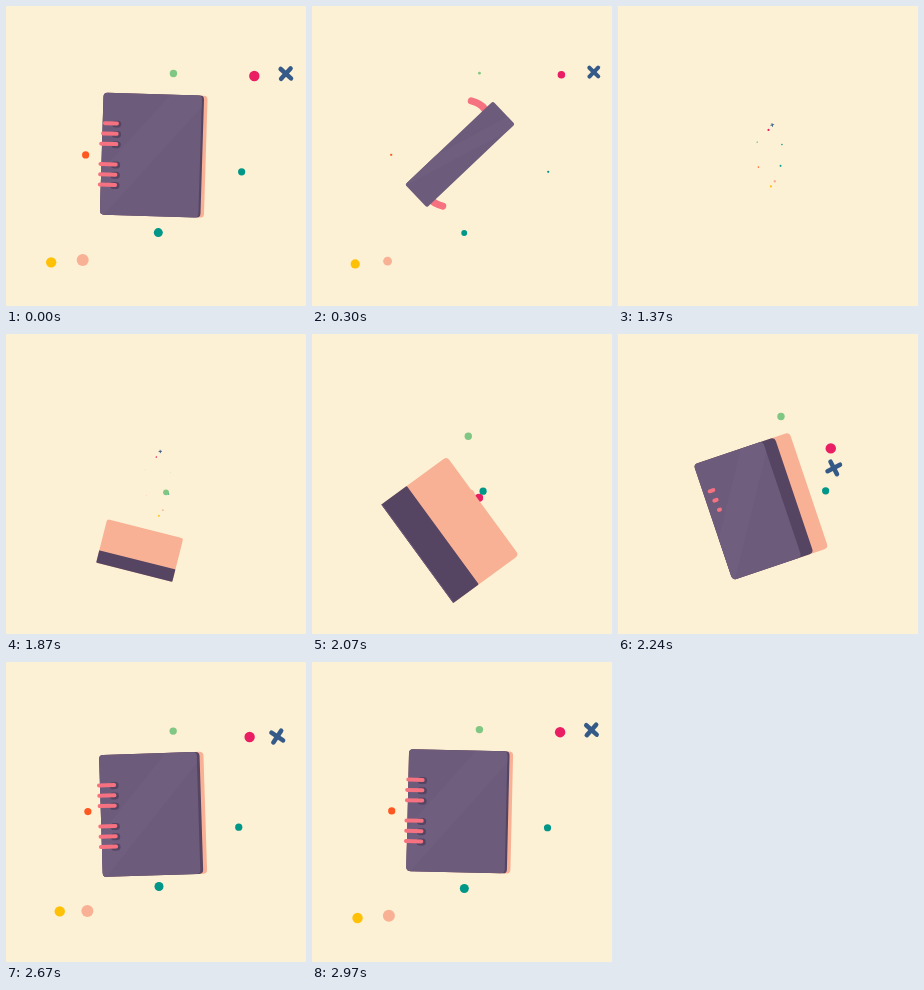
Write an HTML page with a canvas that moves like this. It is 300 by 300 pixels and loops after 3 s.

```html
<!DOCTYPE html>
<html>
<head>
<meta charset="utf-8">
<title>Notebook loop</title>
<style>
html, body { margin: 0; width: 100%; height: 100%; overflow: hidden; background: #fcf1d4; }
canvas { display: block; width: 300px; height: 300px; }
</style>
</head>
<body>
<canvas id="stage"></canvas>
<script>
const LOOP = 3000, RAD = Math.PI / 180;
const PAPER = '#fcf1d4', PINK = '#f67280', PEACH = '#f8b195', BLUE = '#355a88', TEAL = '#009688';
const COVER = '#6c5b7b', SHINE = '#6f5e7e', DARK = '#554562';
const canvas = document.getElementById('stage');
const ctx = canvas.getContext('2d');
const density = window.devicePixelRatio || 1;
canvas.width = canvas.height = 300 * density;

const clamp = v => Math.max(0, Math.min(1, v));
const span = (t, from, to) => clamp((t - from) / (to - from));
const smooth = x => x * x * (3 - 2 * x);
const decay = (t, from, tau) => Math.exp((from - t) / tau);

// Two rings of dots fly out of one centre; each dot is colour, radius, distance, angle.
const INNER = {
  tau: 210, swirl: 40, settle: 1.5,
  start: i => 1861 + 180 * Math.sqrt(i / 3),
  fade: (i, size) => 95 * size,
  dots: [['#81c784', 3.7, 95, 87], ['#ff5722', 3.6, 84.5, 171], [TEAL, 4.5, 66, 261], [TEAL, 3.6, 74, 357]]
};
const OUTER = {
  tau: 230, swirl: -80, settle: 4,
  start: i => 2062 + 65 * (i % 2),
  fade: i => 464 + 160 * (i % 2),
  dots: [['#e91e63', 5.2, 128, 47], [BLUE, 7, 154, 38.8], [PEACH, 6, 128, 227], ['#ffc107', 5.2, 154, 218.8]]
};

function disc(x, y, r, color) {
  ctx.fillStyle = color;
  ctx.beginPath();
  ctx.arc(x, y, r, 0, 7);
  ctx.fill();
}

function line(x1, y1, x2, y2, width, color) {
  ctx.strokeStyle = color;
  ctx.lineWidth = width;
  ctx.lineCap = 'round';
  ctx.beginPath();
  ctx.moveTo(x1, y1);
  ctx.lineTo(x2, y2);
  ctx.stroke();
}

// Draws with the origin at x, y, turned and scaled.
function placed(x, y, angle, scale, paint) {
  ctx.save();
  ctx.translate(x, y);
  ctx.rotate(angle * RAD);
  ctx.scale(scale, scale);
  paint();
  ctx.restore();
}

function panel(width, radius, color) {
  ctx.fillStyle = color;
  ctx.beginPath();
  ctx.roundRect(0, 0, width, 122, radius);
  ctx.fill();
}

function drawRing(t, ring) {
  ring.dots.forEach(([color, size, distance, angle], i) => {
    const start = ring.start(i);
    const left = Math.min(1, decay(t, start, ring.tau));
    const r = size * span(t, start - 70, start + 30) * (1 - span(t, 3000, 3000 + ring.fade(i, size)) ** 3);
    if (r <= 0) return;
    const a = (angle + ring.swirl * left ** ring.settle) * RAD, d = distance * (1 - left);
    const x = 162.5 + d * Math.cos(a), y = 162 - d * Math.sin(a);
    if (color !== BLUE) return disc(x, y, r, color);
    placed(x, y, 45 - 119 * left, 1, () => {
      line(-r, 0, r, 0, r * 0.65, BLUE);
      line(0, -r, 0, r, r * 0.65, BLUE);
    });
  });
}

function drawBurst(t) {
  drawRing(t, OUTER);
  drawRing(t, INNER);
}

function drawSmallBurst(t) {
  placed(150, 150, -50, 0.21, () => {
    ctx.translate(-150, -150);
    drawBurst(t + 1440);
  });
}

// Two arms along the turning cover; their hooked tips straighten while they run out.
function drawArms(t) {
  if (t < 120 || t >= 980) return;
  const turn = span(t, 300, 770), hook = Math.max(0.08, 1 - turn);
  const inner = 54 * span(t, 500, 980) ** 1.55, tip = 29 * hook * RAD;
  for (const half of [0, 180]) {
    placed(145 + 5.5 * turn, 147.5 + 2 * turn, half - 46 * (1 - turn), 1, () => {
      ctx.strokeStyle = PINK;
      ctx.lineWidth = 7 * (1 - span(t, 770, 980));
      ctx.lineCap = ctx.lineJoin = 'round';
      ctx.beginPath();
      ctx.moveTo(inner, 0);
      ctx.lineTo(Math.max(42, inner), 0);
      ctx.quadraticCurveTo(51 + 6.5 * hook, -9 * hook, 54.5 * Math.cos(tip), -54.5 * Math.sin(tip));
      ctx.stroke();
    });
  }
}

function drawCover(c) {
  ctx.save();
  panel(c, Math.min(4, c / 16), COVER);
  ctx.clip();
  ctx.scale(c / 100, 1);
  ctx.fillStyle = SHINE;
  ctx.beginPath();
  ctx.moveTo(68, 0);
  ctx.lineTo(110, 0);
  ctx.lineTo(4, 122);
  ctx.lineTo(-38, 122);
  ctx.fill();
  ctx.restore();
}

function drawRings(t, c) {
  const sx = c / 100;
  for (let i = 0; i < 6; i++) {
    const y = 30.5 + 10.3 * i + (i > 2 ? 10 : 0);
    const shown = span(t, 2200 + i * 15, 2320 + i * 15);
    const gone = span(t, 2960 + i * 20, 3160 + i * 20);
    if (!shown || gone === 1) continue;
    const start = 14.5 - 15.5 * shown + 16 * gone;
    line(13 * sx, y + 0.6, 15.5 * sx, y + 0.6, 7 * shown * (1 - gone * gone), DARK);
    line(start * sx, y, 14.5 * sx, y, 4, PINK);
  }
}

// The book swings up into place, opens to its cover, then spins away edge-on.
function drawBook(t) {
  const grow = smooth(span(t, 1680, 2000)), shrink = smooth(span(t, 3270, 3900));
  const scale = grow * (1 - shrink);
  if (scale <= 0) return;
  const swing = grow * decay(t, 2070, 250);
  const angle = 3 - 39.3 * decay(t, 2070, 286) + 180 * Math.max(0, (t - 2990) / 780) ** 1.53;
  const turned = Math.min(1, decay(t, 2070, 127)), flat = 1 - span(t, 3000, 3200);
  const squeeze = 1 - 0.79 * Math.sin(Math.PI * span(t, 3000, 3800)) ** 2;
  const cover = 98.5 * (1 - turned) * squeeze;
  const edge = (2 + 29 * turned ** 0.75) * grow * flat;
  const pages = (3.5 + 46.5 * turned) * flat;
  placed(148 - 10 * swing, 148 + 48 * swing, angle, scale, () => {
    ctx.translate(-(cover + edge + pages) / 2, -61);
    if (flat) {
      panel(cover + edge + pages, 4, PEACH);
      panel(cover + edge, cover > 5 ? 4 : 1, DARK);
    }
    if (cover > 0.1) {
      drawCover(cover);
      drawRings(t, cover);
    }
  });
}

function draw(now) {
  const t = now % LOOP, life = t < 1200 ? t + LOOP : t;
  ctx.setTransform(density, 0, 0, density, 0, 0);
  ctx.fillStyle = PAPER;
  ctx.fillRect(0, 0, 300, 300);
  drawBurst(life);
  disc(150, 223.8, 3.2 * Math.sin(Math.PI * span(t, 2150, 2650)), PINK);
  drawArms(t);
  drawBook(life);
  if (t > 400 && t < 2040) drawSmallBurst(t);
}

const begin = performance.now();
function tick() {
  draw(performance.now() - begin);
  requestAnimationFrame(tick);
}
tick();
</script>
</body>
</html>
```
